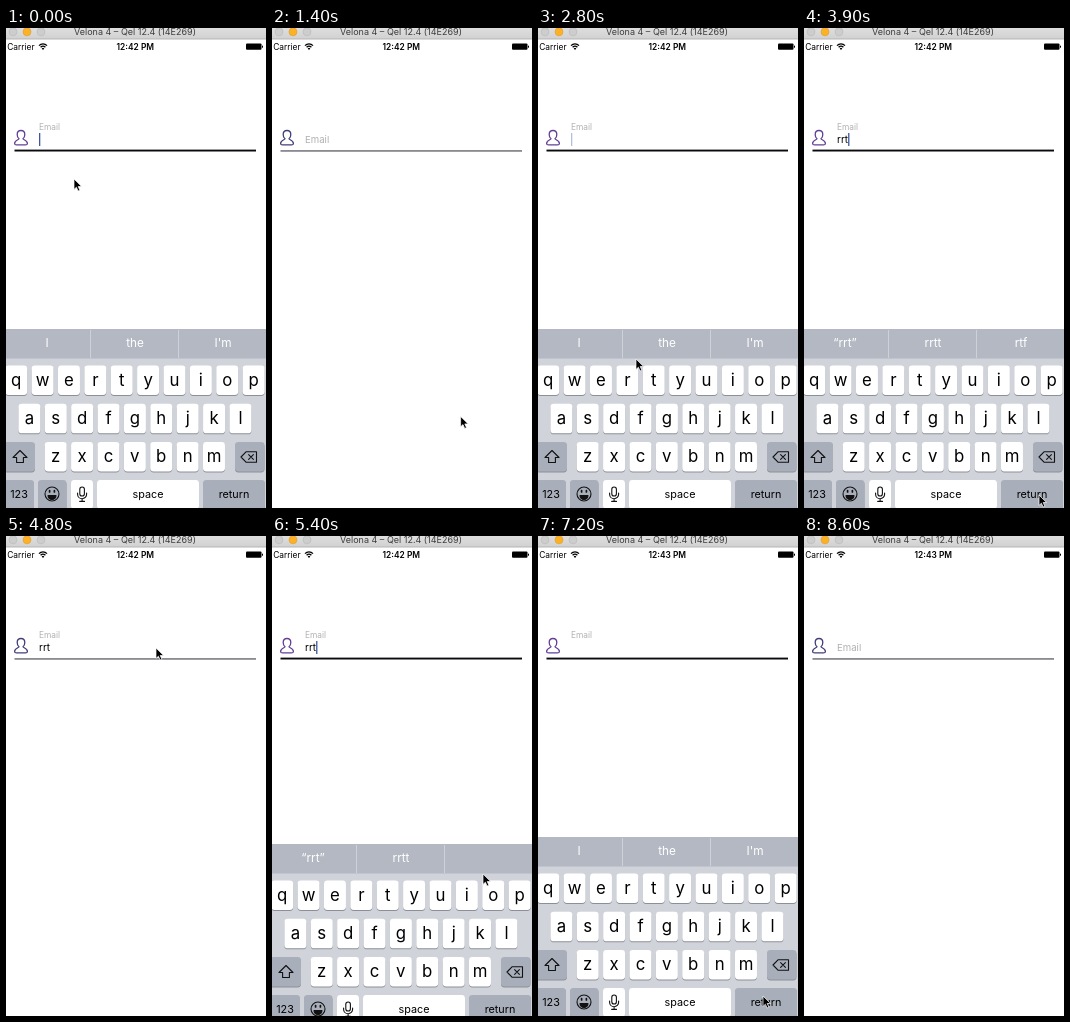
Recreate the animation shown at these times as an HTML page. Size 260 px wide and 480 px high, loop 9.1 s.

```html
<!DOCTYPE html>
<html lang="en">
<head>
<meta charset="utf-8">
<title>Floating label field</title>
<style>
  html, body { margin: 0; height: 100%; overflow: hidden; background: #fff; }
  svg { display: block; width: 100vw; height: 100vh; font-family: Inter, Roboto, sans-serif; }
  .mid { text-anchor: middle; }
  .letter { font-size: 16.8px; }
  .word { font-size: 10.8px; }
  .hint { font-size: 11.8px; fill: #fff; }
  .icon { fill: none; stroke: #111; stroke-width: 1.1; stroke-linejoin: round; stroke-linecap: round; }
</style>
</head>
<body>
<svg viewBox="0 0 260 480">
  <defs>
    <linearGradient id="chrome" x2="0" y2="1">
      <stop stop-color="#dedede"/><stop offset="1" stop-color="#d1d1d1"/>
    </linearGradient>
  </defs>
  <rect width="260" height="480" fill="#fff"/>

  <!-- window and status bars -->
  <rect width="260" height="11" fill="url(#chrome)"/>
  <rect y="10.5" width="260" height="1" fill="#b5b5b5"/>
  <g stroke-width=".6">
    <circle cx="7" cy="3.8" r="4" fill="#cdcdcd" stroke="#b8b8b8"/>
    <circle cx="21" cy="3.8" r="4" fill="#fdb125" stroke="#dd9a2a"/>
    <circle cx="35" cy="3.8" r="4" fill="#cdcdcd" stroke="#b8b8b8"/>
  </g>
  <text class="mid" x="129" y="7.3" font-size="9" fill="#3c3c3c">Velona 4 – Qel 12.4 (14E269)</text>
  <text x="1.2" y="21.6" font-size="8.4">Carrier</text>
  <g fill="none" stroke="#000" stroke-width="1.3">
    <path d="M33 17.6a5.5 5.5 0 0 1 8 0M34.6 19.3a3.4 3.4 0 0 1 4.8 0"/>
    <path d="M37 22l-1.3-1.5a1.8 1.8 0 0 1 2.6 0z" fill="#000" stroke="none"/>
  </g>
  <text id="clock" class="mid" x="129.3" y="21.6" font-size="8.4" font-weight="600"></text>
  <rect x="240" y="15.5" width="15.5" height="6.2" rx="1"/>
  <rect x="256" y="17.4" width="1" height="2.4" rx=".5"/>

  <!-- field -->
  <path id="person" fill="none" stroke-width="1.3" d="M15 102.5c-2.4 0-3.8 1.8-3.8 4 0 2 .9 3.6 1.8 4.3-.1 1-4.4 1.2-4.4 4.6 0 1.2.9 1.5 2 1.5h8.8c1.1 0 2-.3 2-1.5 0-3.4-4.3-3.6-4.4-4.6.9-.7 1.8-2.3 1.8-4.3 0-2.2-1.4-4-3.8-4z"/>
  <text id="label" x="33" fill="#b0b0b4">Email</text>
  <text id="typed" x="33" y="115.4" font-size="10"></text>
  <rect id="caret" y="105" width="1.3" height="13" fill="#3d57a6"/>
  <rect id="line" x="8.5" width="241.5"/>

  <g id="board">
    <rect y="301" width="260" height="190" fill="#d0d4da"/>
    <rect y="301" width="260" height="29.5" fill="#b3b8c2"/>
    <path d="M84.5 302v28M172.5 302v28" stroke="#cdd1d8"/>
    <g id="hints"></g>
    <g id="keys"></g>
    <path class="icon" d="M14 422.5l7 7h-3.6v5h-6.8v-5h-3.6z"/>
    <path class="icon" d="M235 429l5-5.2h10.5v10.4h-10.5zM242.6 426.6l4.8 4.8m0-4.8l-4.8 4.8"/>
    <g class="icon">
      <circle cx="46" cy="466" r="7"/>
      <path d="M42 467.5h8a4 4 0 0 1-8 0z" fill="#111"/>
      <path d="M43.6 462.6v1.4m4.8-1.4v1.4" stroke-width="1.7"/>
      <rect x="73.8" y="459" width="4.6" height="9" rx="2.3"/>
      <path d="M71.6 465v1.2a4.5 4.5 0 0 0 9 0V465M76.1 470.8v2.6m-2.4 0h4.8"/>
    </g>
  </g>

  <path id="mouse" d="M0 0v10.4l2.4-2.2 1.7 3.8 1.8-.8-1.7-3.7h3.4z" stroke="#fff" stroke-width=".7"/>
</svg>
<script>
const LOOP = 9100;
const $ = id => document.getElementById(id);

function add(parent, tag, attrs, text = '') {
  const el = document.createElementNS('http://www.w3.org/2000/svg', tag);
  for (const k in attrs) el.setAttribute(k, attrs[k]);
  el.textContent = text;
  return parent.appendChild(el);
}

const GREY = '#a9afba';
function key(x, y, w, fill, text = '', kind = 'word') {
  const box = { x, y, width: w, height: 29.5, rx: 3.4 };
  add($('keys'), 'rect', { ...box, y: y + 1, fill: '#8b8f96' });
  const face = add($('keys'), 'rect', { ...box, fill });
  const base = y + (kind === 'letter' ? 20.3 : 18);
  if (text) add($('keys'), 'text', { x: x + w / 2, y: base, class: 'mid ' + kind }, text);
  return face;
}

[['qwertyuiop', 10.2, 337.5], ['asdfghjkl', 23.4, 375.8], ['zxcvbnm', 49.7, 414]].forEach(([row, x, y]) =>
  [...row].forEach((c, i) => key(x + i * 26.38 - 11, y, 22, '#fff', c, 'letter')));
key(-2, 414, 31, GREY);
const del = key(229, 414, 29.5, GREY);
key(-2, 452, 30, GREY, '123');
key(32, 452, 28.5, GREY);
key(65, 452, 22, '#fff');
key(91, 452, 102, '#fff', 'space');
const ret = key(197, 452, 62, GREY, 'return');

const hints = [41, 129, 217].map(x => add($('hints'), 'text', { x, y: 319, class: 'mid hint' }));
const words = {
  '': ['I', 'the', 'I\'m'],
  r: ['“r”', 're', 'rr'],
  rr: ['“rr”', 'rrr', 'rt'],
  rrt: ['“rrt”', 'rrtt', 'rtf']
};

// Times in ms
const focus = [[-1000, 900], [2155, 3920], [5125, 7400]];
const floated = [[-1000, 900], [2155, 7400]];
const edits = [[0, ''], [3000, 'r'], [3200, 'rr'], [3400, 'rrt'], [6000, 'rr'], [6200, 'r'], [6400, '']];
const retPress = [[700, 900], [3800, 3900], [7300, 7400]];
const delPress = [[6000, 6080], [6200, 6280], [6400, 6480]];
const route = [
  [0, 68, 151], [700, 226, 463], [1150, 226, 463], [2000, 48, 108], [2250, 48, 108],
  [2800, 98, 331], [2950, 90, 354], [3220, 90, 354], [3360, 115, 356], [3450, 115, 356],
  [3800, 235, 467], [4100, 235, 467], [4800, 150, 112], [5100, 150, 112], [5400, 211, 338],
  [5850, 243, 428], [6500, 243, 428], [6850, 225, 460], [7500, 225, 460], [7850, 226, 454], [8500, 150, -15]
];

const mix = (a, b, p) => a + (b - a) * p;
const clamp = v => Math.min(1, Math.max(0, v));
const rgb = (a, b, p) => `rgb(${a.map((v, i) => Math.round(mix(v, b[i], p)))})`;
const within = (t, spans) => spans.some(([a, b]) => t >= a && t < b);
const last = (t, list) => list.filter(e => e[0] <= t).pop();
const easeOut = ms => 1 - (1 - clamp(ms / 250)) ** 2;

// Critically damped spring of the keyboard
function spring(ms) {
  const x = ms * 0.01826;
  return ms > 500 ? 1 : 1 - Math.exp(-x) * (1 + x);
}

function level(t, spans, ease) {
  const [a, b] = last(t, spans);
  return t < b ? ease(t - a) : 1 - ease(t - b);
}

function blink(t) {
  const p = (t - Math.max(last(t, focus)[0], last(t, edits)[0])) % 1000;
  return p < 850 ? 1 - clamp((p - 560) / 140) : (p - 850) / 150;
}

function pointer(t) {
  const i = route.findIndex(p => p[0] > t);
  if (i < 0) return route[route.length - 1].slice(1);
  const [a, b] = [route[i - 1], route[i]];
  const p = (t - a[0]) / (b[0] - a[0]);
  const s = p * p * (3 - 2 * p);
  return [mix(a[1], b[1], s), mix(a[2], b[2], s)];
}

function set(el, attrs) {
  for (const k in attrs) el.setAttribute(k, attrs[k]);
}

function draw(now) {
  const t = now % LOOP;
  const text = last(t, edits)[1];
  const active = level(t, focus, easeOut);
  const up = level(t, floated, easeOut);
  const thick = 1.1 + 0.8 * active ** 2;

  $('clock').textContent = t < 6300 ? '12:42 PM' : '12:43 PM';
  $('typed').textContent = text;
  hints.forEach((h, i) => {
    const late = i === 2 && t > 5125 && t < 5500;
    h.textContent = late ? '' : words[text][i];
  });

  set($('label'), {
    y: mix(115.4, 102.3, up),
    'font-size': mix(9.6, 8.4, up),
    opacity: 1 - 0.4 * Math.sin(Math.PI * up)
  });
  set($('line'), { y: 123.5 - thick, height: thick, fill: rgb([62, 62, 72], [10, 10, 14], active) });
  set($('person'), { stroke: rgb([66, 62, 120], [98, 62, 150], clamp(active * 3)) });
  set($('caret'), {
    x: 33 + (text ? $('typed').getComputedTextLength() : 0),
    opacity: within(t, focus) ? blink(t) : 0
  });
  set($('board'), { transform: `translate(0 ${179 * (1 - level(t, focus, spring))})` });
  set(ret, { fill: within(t, retPress) ? '#fff' : GREY });
  set(del, { fill: within(t, delPress) ? '#fff' : GREY });
  set($('mouse'), { transform: `translate(${pointer(t)})` });
}

const start = performance.now();
function tick() {
  draw(performance.now() - start);
  requestAnimationFrame(tick);
}
tick();
</script>
</body>
</html>
```
